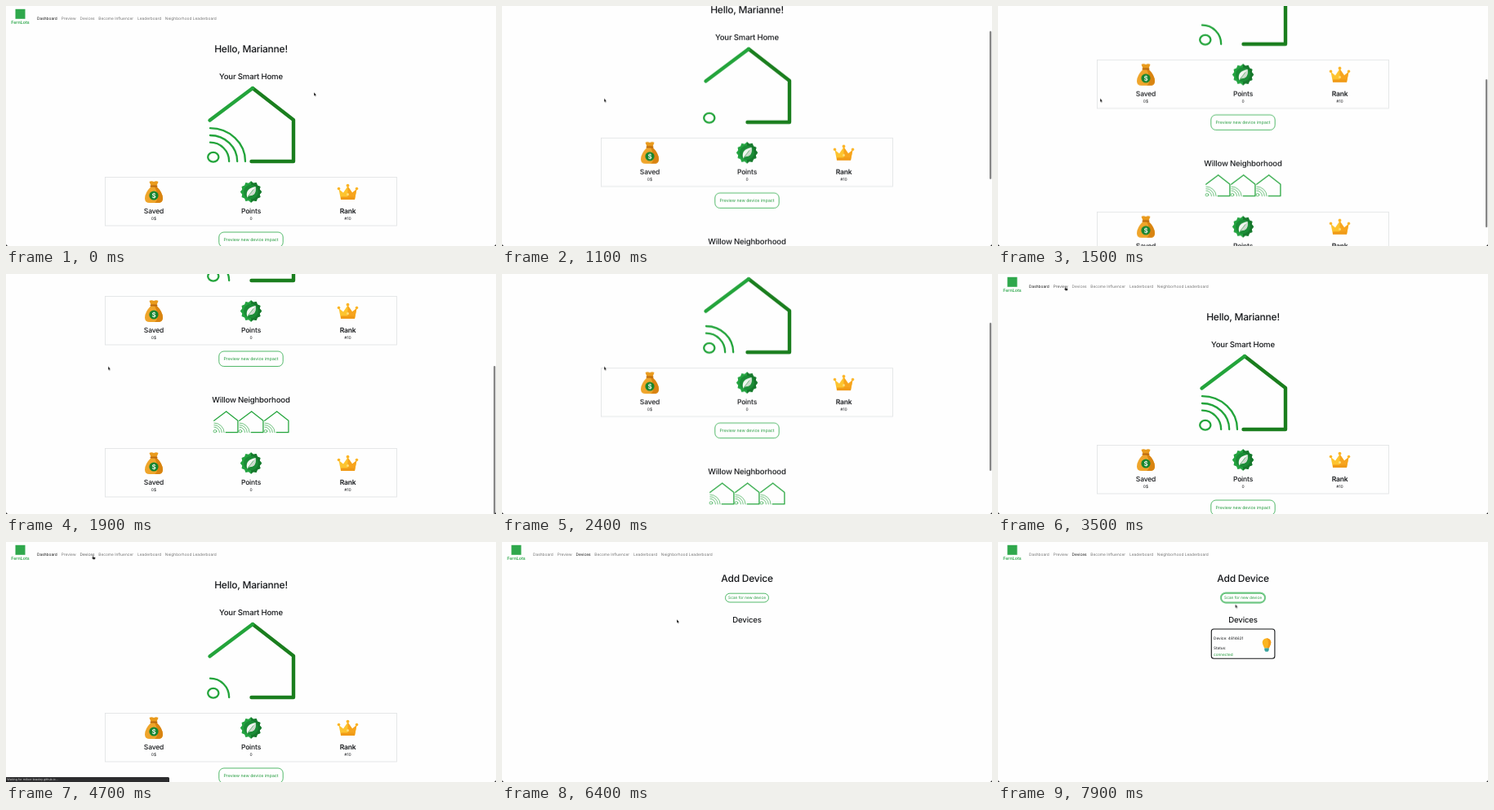
These frames come from a looping animation (600 by 295 pixels, 8000 ms). An HTML page:

```html
<!DOCTYPE html>
<html lang="en">
<head>
<meta charset="utf-8">
<title>Smart home dashboard</title>
<style>
html, body { margin: 0; width: 100%; height: 100%; overflow: hidden; background: #fefefe; }
svg { display: block; width: 100vw; height: 100vh; }
text { font-family: Inter, "Open Sans", sans-serif; fill: #16181b; text-rendering: geometricPrecision; }
.mid { text-anchor: middle; }
.h1, .h2, .h3 { font-weight: 500; letter-spacing: -.02em; text-anchor: middle; }
.h1 { font-size: 12px; }
.h2 { font-size: 9.6px; }
.h3 { font-size: 8.5px; }
.bold { font-weight: 600; }
.small { font-size: 5px; text-anchor: middle; }
.nav text { font-size: 4.8px; fill: #757575; }
.btn { fill: #fefefe; stroke: #28a745; stroke-width: .8; }
.label { font-size: 5.2px; fill: #1f9a3a; text-anchor: middle; }
.device text { font-size: 4.7px; }
.box { fill: none; stroke: #dfe1e3; stroke-width: .8; }
.line { fill: none; stroke: #23a43b; stroke-linecap: round; stroke-linejoin: round; }
.wall { stroke-width: 4.4; }
.right { stroke: var(--right, #1a7e1e); }
.wave { stroke-width: 2.3; }
.mini { --right: #23a43b; }

.anim, .nav .anim, .nav .tab { animation: 8s linear infinite; }
.hard { animation-timing-function: step-end !important; }

.scroll { animation-name: scroll; }
@keyframes scroll {
  0%, 11.25% { transform: translateY(0); }
  18.75% { transform: translateY(-144px); }
  21.25%, 25% { transform: translateY(-183px); }
  30% { transform: translateY(-95px); }
  36.875%, 100% { transform: translateY(0); }
}
.thumb { animation-name: thumb; }
@keyframes thumb {
  0%, 11.25% { transform: translateY(0); opacity: 0; }
  12% { opacity: 1; }
  18.75% { transform: translateY(89px); }
  21.25%, 25% { transform: translateY(112px); }
  30% { transform: translateY(59px); }
  36.875% { transform: translateY(0); opacity: 1; }
  42%, 100% { transform: translateY(0); opacity: 0; }
}

/* wifi waves: one more every 850 ms, then none */
.w1 { animation-name: w1; }
.w2 { animation-name: w2; }
.w3 { animation-name: w3; }
@keyframes w1 { 0%, 15.625%, 58.125% { opacity: 1; } 5%, 47.5% { opacity: 0; } 100% { opacity: 1; } }
@keyframes w2 { 0%, 26.25%, 68.75% { opacity: 1; } 5%, 47.5% { opacity: 0; } 100% { opacity: 1; } }
@keyframes w3 { 0%, 36.875% { opacity: 1; } 5%, 47.5%, 100% { opacity: 0; } }

.dash { animation-name: dash; }
.page2 { animation-name: page2; }
.found { animation-name: found; }
.status { animation-name: status; }
@keyframes dash { 0% { opacity: 1; } 70%, 100% { opacity: 0; } }
@keyframes page2 { 0% { opacity: 0; } 70%, 100% { opacity: 1; } }
@keyframes found { 0% { opacity: 0; } 87.5%, 100% { opacity: 1; } }
@keyframes status { 0%, 70%, 100% { opacity: 0; } 53.75% { opacity: 1; } }

.nav .home { animation-name: home; }
.nav .preview { animation-name: preview; }
.nav .devs { animation-name: devs; }
@keyframes home { 0% { fill: #111; } 70%, 100% { fill: #757575; } }
@keyframes preview { 0%, 50%, 100% { fill: #757575; } 41% { fill: #505050; } }
@keyframes devs { 0% { fill: #757575; } 53% { fill: #505050; } 70%, 100% { fill: #111; } }

.cursor { animation-name: cursor; animation-timing-function: ease-in-out; }
@keyframes cursor {
  0% { transform: translate(377px, 106px); }
  5%, 6.25% { transform: translate(231px, 46px); }
  8.75%, 10% { transform: translate(53px, 8px); }
  13.75%, 35% { transform: translate(125px, 113.5px); }
  41.5%, 47.5% { transform: translate(82px, 15px); }
  56%, 66.875% { transform: translate(106px, 16px); }
  77.5%, 80% { transform: translate(214px, 95px); }
  86.25%, 91.25% { transform: translate(298px, 69px); }
  97.5%, 100% { transform: translate(290.5px, 76.5px); }
}
.arrow { animation-name: arrow; }
.hand { animation-name: hand; }
@keyframes arrow { 0%, 68.5%, 93.5%, 100% { opacity: 1; } 41%, 85% { opacity: 0; } }
@keyframes hand { 0%, 68.5%, 93.5%, 100% { opacity: 0; } 41%, 85% { opacity: 1; } }
</style>
</head>
<body>
<svg viewBox="0 0 600 295" preserveAspectRatio="none">
  <defs>
    <g id="house" class="line">
      <path class="wall right" d="M302 101L352 140V191H300.500"/>
      <path class="wall" d="M249.500 140.500L302 101"/>
      <ellipse class="wave" cx="253.800" cy="185.800" rx="6.600" ry="5.900"/>
    </g>
    <path id="wave1" class="line wave" d="M250 167.700A23.200 23.300 0 0 1 273.200 191"/>
    <path id="wave2" class="line wave" d="M250 159A33.200 32 0 0 1 283.200 191"/>
    <path id="wave3" class="line wave" d="M250 150.200A43 40.800 0 0 1 293 191"/>
    <g id="mini" transform="scale(.285)">
      <g transform="translate(-247 -99)">
        <use href="#house"/><use href="#wave1"/><use href="#wave2"/><use href="#wave3"/>
      </g>
    </g>

    <g id="bag">
      <path fill="#e99a1c" d="M-5.500 -12.500Q-3 -14 0 -12.500Q3 -14 5.500 -12.500L3.500 -7.500H-3.500Z"/>
      <path fill="#efa52b" d="M-3.500 -6.500H3.500Q11 1 11 8Q11 13.500 5 13.500H-5Q-11 13.500 -11 8Q-11 1 -3.500 -6.500Z"/>
      <path fill="#d98411" d="M3.500 -6.500Q11 1 11 8Q11 13.500 5 13.500H1Q8 9 1 -6.500Z"/>
      <rect x="-4.500" y="-8" width="9" height="2" rx="1" fill="#b9690f"/>
      <circle cy="4.500" r="5.600" fill="#17852f"/>
      <text class="mid bold" y="7.500" style="font-size:8px;fill:#fff">$</text>
    </g>
    <g id="badge">
      <path id="burst" fill="#23a340"/>
      <path id="burstHalf" fill="#16772c" clip-path="url(#rightHalf)"/>
      <circle r="9" fill="#1b8c36"/>
      <path fill="#f4f7f2" d="M-5 5.500Q-7 -4 5.500 -6.500Q7 5 -2.500 4.800L-4.500 7Z"/>
      <path fill="#cfdccf" d="M5.500 -6.500Q7 5 -2.500 4.800Z"/>
      <path fill="none" stroke="#1b8c36" stroke-width=".6" d="M-4 6L3 -3"/>
    </g>
    <clipPath id="rightHalf"><rect x="0" y="-14" width="14" height="28"/></clipPath>
    <g id="crown">
      <path fill="#fdc42f" d="M-11 -3.500L-5.500 1L0 -7L5.500 1L11 -3.500L8.500 9.500H-8.500Z"/>
      <path fill="#f7a41d" d="M0 -7L5.500 1L11 -3.500L8.500 9.500H0Z"/>
      <rect x="-8.500" y="6" width="17" height="3.500" rx=".6" fill="#f09a17"/>
      <g fill="#fcb526">
        <circle cx="-11" cy="-4" r="1.800"/><circle cy="-7.800" r="1.900"/><circle cx="11" cy="-4" r="1.800"/>
      </g>
      <circle cy="3" r="1.500" fill="#fde07a"/>
    </g>

    <g id="stats">
      <rect class="box" x="121.500" y="210.500" width="357" height="59.500"/>
      <use href="#bag" x="181" y="228.500"/>
      <use href="#badge" x="300" y="228.500"/>
      <use href="#crown" x="418.500" y="228.500"/>
      <text class="h3" x="181" y="254.500">Saved</text>
      <text class="h3" x="300" y="254.500">Points</text>
      <text class="h3 bold" x="418.500" y="254.500">Rank</text>
      <text class="small" x="181" y="263">0$</text>
      <text class="small" x="300" y="263">0</text>
      <text class="small" x="418.500" y="263">#10</text>
    </g>
  </defs>

  <rect width="600" height="295" fill="#fefefe"/>

  <g class="anim scroll">
    <g class="nav">
      <rect x="11.500" y="3.800" width="12" height="12" fill="#2fa84c"/>
      <text class="mid" x="17.500" y="21.600" style="font-size:5.300px;font-weight:600;fill:#2fa84c">FernLots</text>
      <text class="tab hard home" x="38" y="16.800">Dashboard</text>
      <text class="tab hard preview" x="67.700" y="16.800">Preview</text>
      <text class="tab hard devs" x="90.500" y="16.800">Devices</text>
      <text x="113.300" y="16.800">Become Influencer</text>
      <text x="161" y="16.800">Leaderboard</text>
      <text x="194.800" y="16.800">Neighborhood Leaderboard</text>
    </g>

    <g class="anim hard dash">
      <text class="h1" x="300" y="57">Hello, Marianne!</text>
      <text class="h2" x="300" y="89.700">Your Smart Home</text>
      <use href="#house"/>
      <use href="#wave1" class="anim hard w1"/>
      <use href="#wave2" class="anim hard w2"/>
      <use href="#wave3" class="anim hard w3"/>
      <use href="#stats"/>
      <rect class="btn" x="260.800" y="278" width="78.400" height="18.500" rx="6"/>
      <text class="label" x="300" y="289.200">Preview new device impact</text>
      <text class="h2" x="300" y="341">Willow Neighborhood</text>
      <g class="mini">
        <use href="#mini" x="254" y="351.500"/>
        <use href="#mini" x="285" y="351.500"/>
        <use href="#mini" x="316" y="351.500"/>
      </g>
      <use href="#stats" y="187"/>
    </g>
  </g>

  <g class="anim hard page2">
    <text class="h1" x="300" y="49.300">Add Device</text>
    <rect class="anim hard found" x="272.600" y="62.300" width="54.800" height="12.600" rx="6.300" fill="none" stroke="#7fd093" stroke-width="1.500"/>
    <rect class="btn" x="273.500" y="63.200" width="53" height="10.800" rx="5.400"/>
    <text class="label" x="300" y="70.400" style="font-size:4.750px">Scan for new device</text>
    <text class="h2" x="300" y="99.200">Devices</text>
    <g class="anim hard found device">
      <rect x="261.300" y="107" width="77.600" height="36.300" rx="3" fill="#fefefe" stroke="#17191b" stroke-width="1.100"/>
      <text x="264" y="119.800">Device: 4814621</text>
      <text x="264" y="132.300">Status:</text>
      <text x="264" y="140" style="fill:#1f9a3a">connected</text>
      <path fill="#fbb41f" d="M329 118.300A5.300 5.300 0 0 1 334.300 123.600Q334.300 126 331.800 130.500H326.200Q323.700 126 323.700 123.600A5.300 5.300 0 0 1 329 118.300Z"/>
      <path fill="#f29a18" d="M329 118.300A5.300 5.300 0 0 1 334.300 123.600Q334.300 126 331.800 130.500H329.500Q333 124 329 118.300Z"/>
      <path fill="#38a3a0" d="M326.300 130.500H331.700V133L330.500 134.800H327.500L326.300 133Z"/>
    </g>
  </g>

  <rect class="anim thumb" x="597" y="1" width="2.300" height="182" rx="1.100" fill="#858585"/>

  <g class="anim hard status">
    <path fill="#2c2c2e" d="M0 289H198.500Q200 289 200 290.500V295H0Z"/>
    <text x="1.300" y="293.200" style="font-size:3.600px;fill:#d5d5d5">Waiting for milton-braxley.github.io...</text>
  </g>

  <path fill="#111" d="M0 292.500Q.2 294.800 2.500 295H0ZM600 292.500Q599.800 294.800 597.500 295H600Z"/>

  <g class="anim cursor" stroke="#fff" stroke-width=".4" stroke-linejoin="round">
    <path class="anim hard arrow" fill="#0a0a0a" d="M0 0V4.600L1.050 3.700L1.750 5.300L2.600 4.900L1.900 3.400H3.300Z"/>
    <path class="anim hard hand" fill="#222" d="M0 .5Q.5 -.2 1 .5V2.200L3.300 2.700Q3.600 2.800 3.500 3.600L3 5.500H.7L-1 3.400Q-.9 2.700 0 3.200Z"/>
  </g>
</svg>
<script>
// twelve-point rosette behind the leaf
const points = Array.from({ length: 24 }, (_, i) => {
  const r = i % 2 ? 11.200 : 13.200, a = i * Math.PI / 12;
  return (r * Math.sin(a)).toFixed(2) + " " + (-r * Math.cos(a)).toFixed(2);
});
for (const id of ["burst", "burstHalf"])
  document.getElementById(id).setAttribute("d", "M" + points.join("L") + "Z");
</script>
</body>
</html>
```
